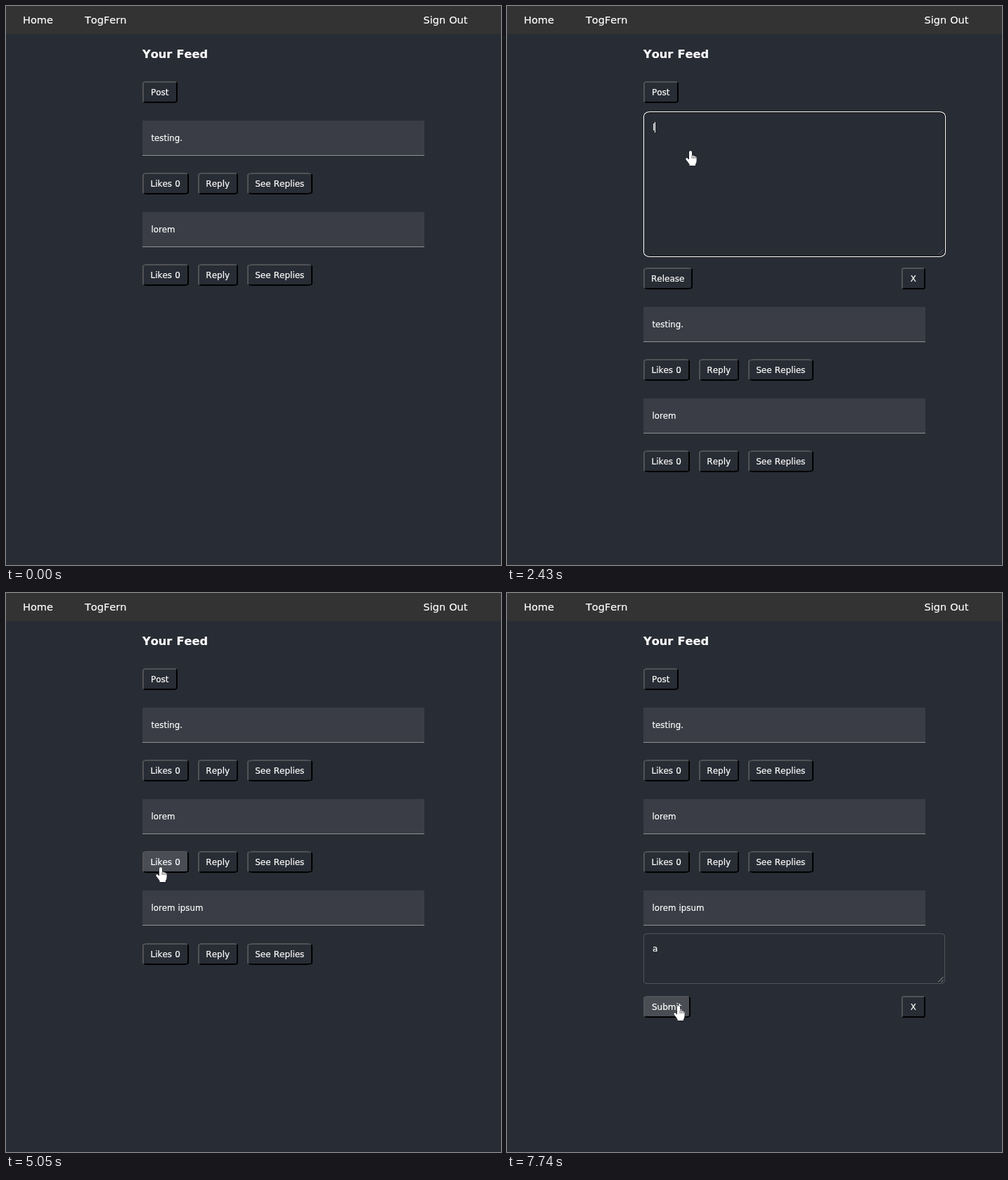
These frames come from a looping animation (704x795 px, 8000 ms). An HTML page:

```html
<!DOCTYPE html>
<html lang="en">
<head>
<meta charset="utf-8">
<title>Your Feed</title>
<style>
  html, body { margin: 0; width: 100%; height: 100%; overflow: hidden; background: #282c34; }
  body {
    position: relative; color: #fff; white-space: pre;
    font: 12px/20px "DejaVu Sans", Verdana, sans-serif;
    font-kerning: none; word-spacing: .034em; -webkit-text-stroke: .2px;
  }
  body div, svg { position: absolute; box-sizing: border-box; }
  [hidden] { display: none !important; }
  nav { position: absolute; left: 0; top: 0; width: 100%; height: 40px; background: #333; font-size: 14.5px; }
  .title { font-size: 16.2px; font-weight: bold; }
  .card { left: 194px; width: 401px; height: 50px; background: #3a3d45; border-bottom: 1px solid #8e9094; font-size: 11.75px; }
  .card div { left: 12.5px; top: 15px; }
  .btn {
    height: 31px; line-height: 28px; text-align: center; text-indent: -.5px;
    border: 2px solid; border-color: #505256 #000 #000 #505256; border-radius: 10%;
  }
  .btn.hover { background: #4a4d54; }
  .area { left: 194px; width: 429px; border: 1px solid #50535a; border-radius: 9px / 7px; }
  .area.small { border-radius: 6px / 4px; }
  .area.focus { border-color: #101010; }
  .area.focus::after {
    content: ""; position: absolute; inset: -2px -2px -2px -1px;
    border: 1px solid #fff; border-radius: inherit;
  }
  .area div { left: 12px; top: 11px; }
  .area svg { right: 1px; bottom: 1px; }
  .area.focus svg { opacity: .4; }
  .caret { position: absolute; top: 2px; width: 1px; height: 15px; background: #fff; }
  #pointer { left: 0; top: 0; overflow: visible; z-index: 1; }
  #pointer path { fill: #fff; stroke: #15171b; stroke-width: 1; paint-order: stroke; stroke-linejoin: round; }
  #pointer .gaps { fill: none; stroke: #333; stroke-width: .8; }
</style>
</head>
<body>
<nav></nav>
<svg id="pointer" width="1" height="1">
  <path id="arrow" d="M.5 .5V15.6L4 12.4L6.2 17.5L8.5 16.5L6.3 11.5H11.2Z"/>
  <g id="hand">
    <path d="M-2 2Q-2 0 0 0T2 2V7Q3.6 5.9 4.5 7.4Q6 6.7 6.9 8.3Q8.6 8 8.6 10.5V14Q8.6 17 7 19V21H-1.5V19Q-3 17 -6.4 12.6Q-7.2 10 -5 10L-2 12.6Z"/>
    <path class="gaps" d="M2.2 7V11M4.6 7.6V11M6.9 8.5V11"/>
  </g>
</svg>
<script>
const LOOP = 8000, STEP = 70, BLINK = 530;
const OPEN = 1410, FOCUS = 1900, TYPED = 3490, BLUR = 4840, CLOSE = 4910;
const REPLY = 6160, REPLY_FOCUS = 6640, REPLY_TYPED = 6920, REPLY_BLUR = 7540;
const PHRASE = "lorem ipsum";

// Pointer strokes: start, end, and the point reached
const strokes = [
  [180, 250, 622, 397],
  [450, 650, 262, 293],
  [780, 850, 269, 237],
  [850, 1200, 222, 122],
  [1620, 1830, 261, 206],
  [3950, 4510, 212, 414],
  [4510, 4720, 220, 390],
  [5180, 5740, 276, 600],
  [5740, 6020, 289, 515],
  [6360, 6430, 289, 528],
  [6640, 7540, 244, 587]
];

const $ = id => document.getElementById(id);
const ease = k => k * k * (3 - 2 * k);

function add(cls, text = "", parent = document.body) {
  const el = document.createElement("div");
  el.className = cls;
  el.textContent = text;
  parent.append(el);
  return el;
}

function label(x, y, text, cls = "", parent = document.body) {
  const el = add(cls, text, parent);
  el.style.left = x + "px";
  el.style.top = y + "px";
}

const buttons = [];
function button(x, y, w, text) {
  const b = { x, y, w, el: add("btn", text) };
  b.el.style.left = x + "px";
  b.el.style.width = w + "px";
  buttons.push(b);
  return b;
}

function area(y, h, cls) {
  const el = add("area " + cls);
  el.style.top = y + "px";
  el.style.height = h + "px";
  el.innerHTML = '<svg width="8" height="8"><path d="M0 7.5L7.5 0M4.5 7.5L7.5 4.5" stroke="#a5a7aa" stroke-width=".9"/></svg>' +
    '<div><span></span><i class="caret"></i></div>';
  return { el, text: el.querySelector("span"), caret: el.querySelector("i") };
}

// The caret stays lit until one blink after the last key
function setArea(a, shown, focused, text, caretAge) {
  a.el.hidden = !shown;
  a.el.classList.toggle("focus", focused);
  a.text.textContent = text;
  a.caret.hidden = !focused || Math.floor(caretAge / BLINK) % 2 === 1;
}

const nav = document.querySelector("nav");
label(24, 10, "Home", "", nav);
label(112, 10, "TogFern", "", nav);
label(593.5, 10, "Sign Out", "", nav);
label(194, 58.5, "Your Feed", "title");

button(194, 107, 50, "Post");
const posts = ["testing.", "lorem", PHRASE].map(text => {
  const card = add("card");
  add("", text, card);
  return {
    card,
    row: [button(194, 0, 66, "Likes 0"), button(273, 0, 57, "Reply"), button(343, 0, 93, "See Replies")]
  };
});
const composer = area(151, 205, "");
const reply = area(484, 72, "small");
const composerRow = [button(194, 372, 70, "Release"), button(561, 372, 34, "X")];
const replyRow = [button(194, 573, 67, "Submit"), button(561, 573, 34, "X")];

const show = (row, on) => row.forEach(b => b.el.hidden = !on);

function pointerAt(t) {
  let x = 622, y = 449;
  for (const [from, to, toX, toY] of strokes) {
    if (t < from) break;
    const held = Math.floor((t - from) / STEP) * STEP;
    const k = t >= to ? 1 : ease(held / (to - from));
    x += (toX - x) * k;
    y += (toY - y) * k;
  }
  return [Math.round(x), Math.round(y)];
}

// A first letter, a short pause, then an even rhythm up to the last one
function typed(t) {
  if (t < 2430) return "";
  const n = 2 + Math.floor((t - 2630) * 9 / (TYPED - 2630));
  return PHRASE.slice(0, Math.max(1, n));
}

function render(t) {
  const open = t >= OPEN && t < CLOSE;
  const replying = t >= REPLY;

  posts.forEach((p, i) => {
    const y = 162.9 + i * 130.25 + (open ? 265 : 0);
    const on = i < 2 || t >= CLOSE;
    p.card.hidden = !on;
    p.card.style.top = Math.round(y) + "px";
    p.row.forEach(b => b.y = Math.round(y + 74.2));
    show(p.row, on && !(i === 2 && replying));
  });
  show(composerRow, open);
  show(replyRow, replying);

  setArea(composer, open, t >= FOCUS && t < BLUR, typed(t), t - TYPED);
  setArea(reply, replying, t >= REPLY_FOCUS && t < REPLY_BLUR, t >= REPLY_TYPED ? "a" : "", t - REPLY_TYPED);

  const [px, py] = pointerAt(t);
  const arrow = px > 595;
  $("pointer").style.visibility = t < 180 ? "hidden" : "";
  $("pointer").style.transform = `translate(${px}px, ${py}px)`;
  $("arrow").style.display = arrow ? "" : "none";
  $("hand").style.display = arrow ? "none" : "";

  for (const b of buttons) {
    b.el.style.top = b.y + "px";
    const over = px >= b.x && px < b.x + b.w && py >= b.y && py < b.y + 31;
    b.el.classList.toggle("hover", over);
  }
}

const start = performance.now();
function tick() {
  render((performance.now() - start) % LOOP);
  requestAnimationFrame(tick);
}
tick();
</script>
</body>
</html>
```
